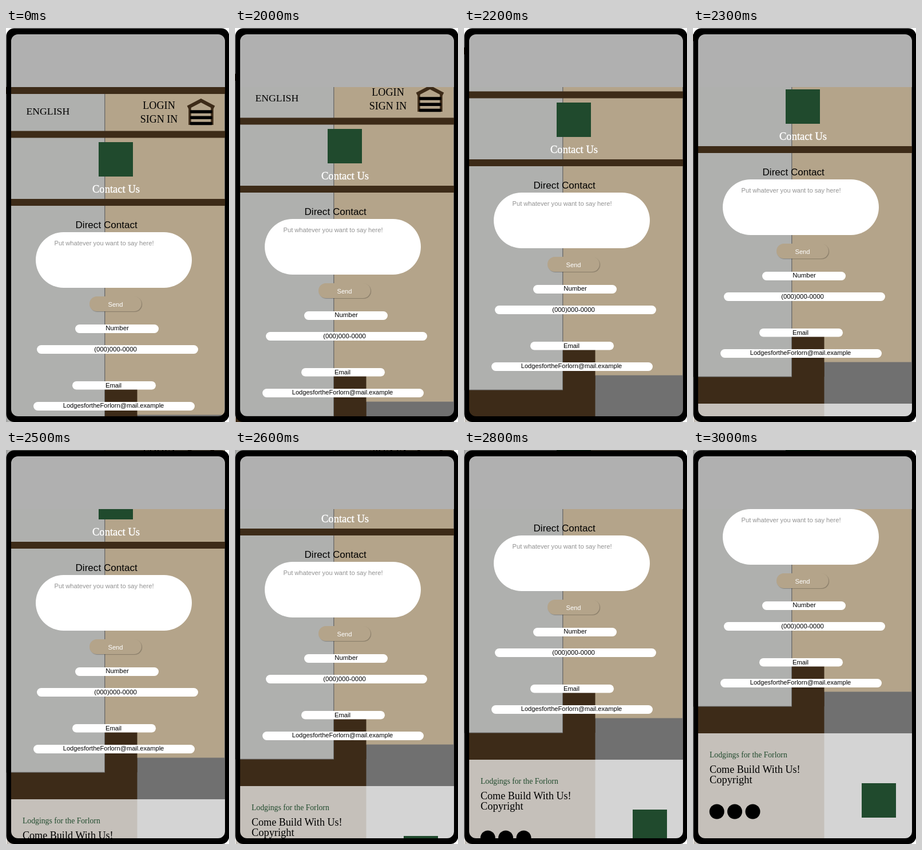
Animation, 390 px wide and 687 px high, one loop 5 s. Source, as an HTML page with a canvas:

```html
<!DOCTYPE html>
<html lang="en">
<head>
<meta charset="utf-8">
<title>Contact page scroll</title>
<style>
  html, body { margin: 0; width: 100%; height: 100%; overflow: hidden; background: #fff; }
  canvas { display: block; width: 390px; height: 687px; }
</style>
</head>
<body>
<canvas id="stage"></canvas>
<script>
const W = 390, H = 687, LOOP = 5000;
const SCROLL_START = 2000, STEP_MS = 100, STEP_PX = 23, STEPS = 11;
const SERIF = '"Liberation Serif", serif';
const SANS = '"Liberation Sans", sans-serif';
const BROWN = '#3d2b18', TAN = '#b4a48a', GREY = '#afb0ae', SLATE = '#707070';
const GREEN = '#204a2d', WHITE = '#fff', BLACK = '#000';

const canvas = document.getElementById('stage');
const dpr = window.devicePixelRatio || 1;
canvas.width = Math.round(W * dpr);
canvas.height = Math.round(H * dpr);
const ctx = canvas.getContext('2d');

// Boxes are given by their edges: left, top, right, bottom.
function box(l, t, r, b, color) {
  ctx.fillStyle = color;
  ctx.fillRect(l, t, r - l, b - t);
}

function outlinedBox(l, t, r, b, color) {
  box(l, t, r, b, color);
  ctx.strokeStyle = SLATE;
  ctx.lineWidth = 1;
  ctx.strokeRect(l, t, r - l, b - t);
}

function pill(l, t, r, b, color = WHITE) {
  ctx.fillStyle = color;
  ctx.beginPath();
  ctx.roundRect(l, t, r - l, b - t, (b - t) / 2);
  ctx.fill();
}

function text(str, x, y, size, family, color = BLACK, align = 'left') {
  ctx.font = `${size}px ${family}`;
  ctx.textAlign = align;
  ctx.fillStyle = color;
  ctx.fillText(str, x, y);
}

function line(points, width, color) {
  ctx.strokeStyle = color;
  ctx.lineWidth = width;
  ctx.beginPath();
  points.forEach(([x, y]) => ctx.lineTo(x, y));
  ctx.stroke();
}

function emblem(cx, cy) {
  box(cx - 30, cy - 30, cx + 30, cy + 30, GREEN);
}

function backdrop() {
  box(1, 623, 230, 940, BROWN);
  box(229.5, 675, 383, 940, SLATE);
  outlinedBox(173, 103, 382.5, 675, TAN);
  box(173, 623, 229.5, 700, BROWN);
  outlinedBox(1, 103, 172.5, 700, GREY);
  box(0, 103, 383, 115, BROWN);
  box(1, 179.5, 383, 191.5, BROWN);
  box(1, 298, 383, 310, BROWN);
}

function menuIcon() {
  line([[321.5, 136], [321.5, 169]], 4.5, BROWN);
  line([[360.5, 136], [360.5, 169]], 4.5, BROWN);
  line([[318, 138.5], [341, 126.5], [364, 138.5]], 6, BROWN);
  for (const y of [143.2, 153.5, 163.8]) {
    ctx.fillStyle = BLACK;
    ctx.beginPath();
    ctx.roundRect(322, y, 38.5, 5.5, 1);
    ctx.fill();
  }
}

function nav() {
  text('ENGLISH', 35.5, 150.5, 17.7, SERIF);
  text('LOGIN', 267.5, 141, 18.2, SERIF, BLACK, 'center');
  text('SIGN IN', 267.5, 164.5, 18, SERIF, BLACK, 'center');
  menuIcon();
  emblem(192, 229);
  text('Contact Us', 192.5, 287, 18.6, SERIF, WHITE, 'center');
  ctx.strokeStyle = WHITE;
  ctx.lineWidth = 0.35;
  ctx.strokeText('Contact Us', 192.5, 287);
}

function form() {
  text('Direct Contact', 121.5, 349, 17.1, SANS);
  pill(52, 356, 325, 453);
  text('Put whatever you want to say here!', 84.5, 379.2, 11.15, SANS, '#929292');

  ctx.save();
  ctx.shadowColor = 'rgba(0,0,0,.25)';
  ctx.shadowOffsetX = ctx.shadowOffsetY = dpr;
  ctx.shadowBlur = dpr;
  pill(146, 468, 237, 494, TAN);
  ctx.restore();
  text('Send', 191.5, 486, 11.2, SANS, WHITE, 'center');

  pill(121, 517, 267, 532);
  text('Number', 194.5, 527, 11.4, SANS, BLACK, 'center');
  pill(54, 553, 336, 568);
  text('(000)000-0000', 191.5, 563.5, 11.4, SANS, BLACK, 'center');
  pill(116, 616, 262, 630.5);
  text('Email', 188, 627.3, 11.3, SANS, BLACK, 'center');
  pill(48, 652, 330, 667);
  text('LodgesfortheForlorn@mail.example', 188, 662, 11.1, SANS, BLACK, 'center');
}

function footer() {
  box(1, 747, 383, 940, 'rgba(255,255,255,.7)');
  text('Lodgings for the Forlorn', 29, 789, 13.7, SERIF, GREEN);
  text('Come Build With Us!', 29, 815.5, 18.1, SERIF);
  text('Copyright', 29, 834, 18.4, SERIF);
  for (const x of [41.7, 73, 104.5]) pill(x - 13, 870.5, x + 13, 896.5, BLACK);
  emblem(325, 864);
}

function phone() {
  box(9, 11, 383, 103, '#b0b0b0');
  ctx.fillStyle = BLACK;
  ctx.beginPath();
  ctx.roundRect(0.5, 0.5, 390, 686.5, 14);
  ctx.roundRect(9, 11, 374, 666, 12);
  ctx.fill('evenodd');
}

function scrollAt(t) {
  const step = Math.floor((t - SCROLL_START) / STEP_MS) + 1;
  return STEP_PX * Math.max(0, Math.min(STEPS, step));
}

function draw(t) {
  ctx.setTransform(dpr, 0, 0, dpr, 0, 0);
  box(0, 0, W, H, WHITE);
  ctx.save();
  ctx.translate(0, -scrollAt(t));
  backdrop();
  nav();
  form();
  footer();
  ctx.restore();
  phone();
}

const start = performance.now();
function frame() {
  draw((performance.now() - start) % LOOP);
  requestAnimationFrame(frame);
}
frame();
</script>
</body>
</html>
```
